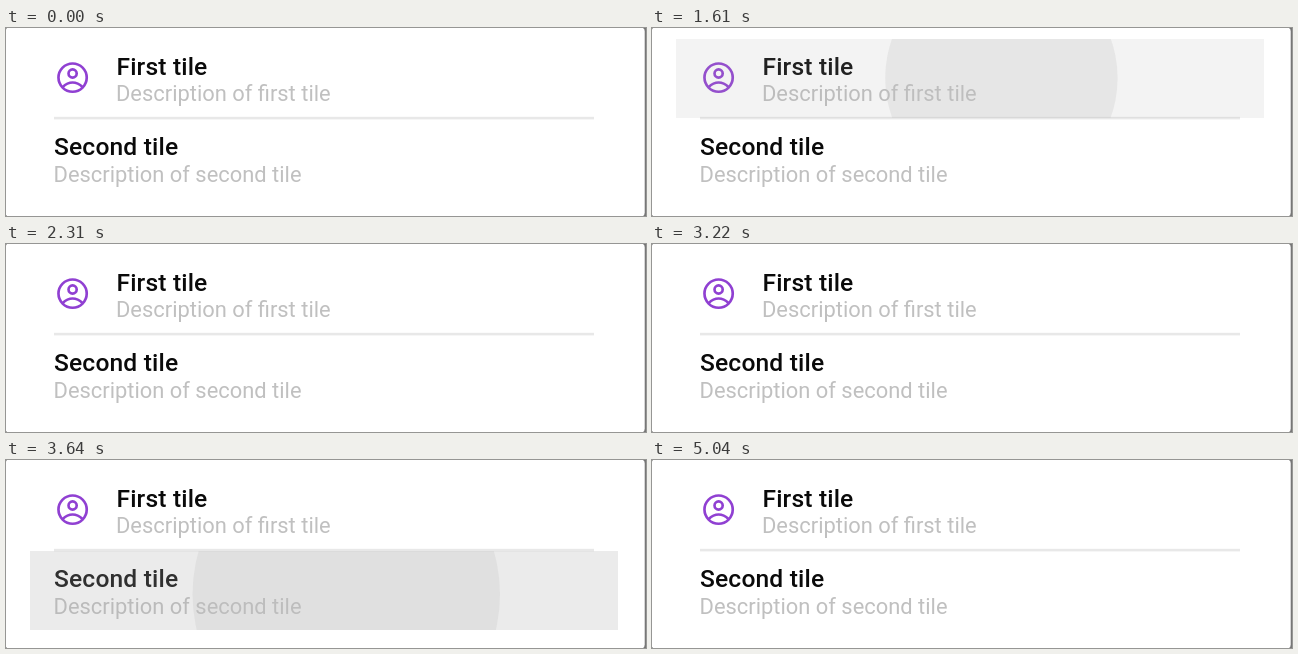
An HTML page that plays this animation: 640 px wide and 188 px high, repeating every 5.11 s.

```html
<!DOCTYPE html>
<html lang="en">
<head>
<meta charset="utf-8">
<title>List tiles</title>
<style>
  html, body { margin: 0; width: 100%; height: 100%; overflow: hidden; background: #777; }
  svg { display: block; width: 640px; height: 188px; }
  text { font-family: Roboto, sans-serif; }
  .title { font-size: 24.6px; font-weight: 500; letter-spacing: .15px; fill: #0a0a0a; }
  .note { font-size: 21.9px; fill: #c0c0c0; }
  .icon { fill: none; stroke: #9040d2; stroke-width: 1.7; }
  .highlight { fill: #aaa; opacity: 0; }
  .splash { fill: #c0c0c0; opacity: 0; }
</style>
</head>
<body>
<svg viewBox="0 0 640 188">
  <defs>
    <clipPath id="clip0"><rect x="24" y="11" width="588" height="79"/></clipPath>
    <clipPath id="clip1"><rect x="24" y="91" width="588" height="79"/></clipPath>
  </defs>
  <rect x="-.5" y="-.5" width="639.2" height="189" rx="4" fill="#fff"/>
  <rect x="48" y="88.8" width="540" height="2.6" fill="#e8e8e8"/>

  <g class="icon" transform="translate(66.6 49.6) scale(1.57) translate(-12 -12)">
    <circle cx="12" cy="12" r="9"/>
    <circle cx="12" cy="9.4" r="2.6"/>
    <path d="M5.7 18Q8.6 15.1 12 15.1T18.3 18"/>
  </g>
  <text class="title" x="110.5" y="46.5">First tile</text>
  <text class="note" x="110" y="73">Description of first tile</text>
  <text class="title" x="48" y="126.6">Second tile</text>
  <text class="note" x="47.6" y="154">Description of second tile</text>

  <g class="ink" clip-path="url(#clip0)">
    <rect class="highlight" x="24" y="11" width="588" height="79"/>
    <circle class="splash"/>
  </g>
  <g class="ink" clip-path="url(#clip1)">
    <rect class="highlight" x="24" y="91" width="588" height="79"/>
    <circle class="splash"/>
  </g>
</svg>
<script>
  const LOOP = 5110, STEP = 70;
  const RADIUS = Math.hypot(588, 79) / 2;

  // Times in ms: press, release, end of the fade. (x, y) is the touch, cy the tile's middle.
  const taps = [
    { press: 1490, release: 1955, end: 2305, x: 354, y: 50, cy: 50.5 },
    { press: 3436, release: 3980, end: 4270, x: 350, y: 136, cy: 130.5 }
  ];

  const clamp = v => Math.min(1, Math.max(0, v));
  const ramp = (t, from, to) => clamp((t - from) / (to - from));
  const mix = (a, b, k) => a + (b - a) * k;

  // Same curve as the CSS "ease" keyword.
  function ease(x) {
    const bezier = (a, b, s) => 3 * a * s * (1 - s) ** 2 + 3 * b * s * s * (1 - s) + s ** 3;
    let lo = 0, hi = 1;
    for (let i = 0; i < 24; i++) {
      const mid = (lo + hi) / 2;
      if (bezier(.25, .25, mid) < x) lo = mid; else hi = mid;
    }
    return bezier(.1, 1, lo);
  }

  const inks = [...document.querySelectorAll('.ink')].map(g => ({
    highlight: g.querySelector('.highlight'),
    splash: g.querySelector('.splash')
  }));

  function drawTap(tap, ink, t) {
    const { press, release, end } = tap;
    // Slow growth while held, quick growth once released.
    const held = Math.min(t, release) - press;
    const grown = ease(clamp(held / 1000 + Math.max(0, t - release) / 225));
    const fadeStart = mix(release, end, .6);

    ink.highlight.style.opacity =
      .235 * ramp(t, press, press + 200) * (1 - ramp(t, release, release + 200));
    ink.splash.style.opacity =
      .26 * ramp(t, press, press + 75) * (1 - ramp(t, fadeStart, end));
    ink.splash.setAttribute('cx', mix(tap.x, 318, grown));
    ink.splash.setAttribute('cy', mix(tap.y, tap.cy, grown));
    ink.splash.setAttribute('r', mix(RADIUS * .3, RADIUS + 5, grown));
  }

  const start = performance.now();
  function draw() {
    const now = Math.max(0, performance.now() - start) % LOOP;
    const t = Math.floor(now / STEP) * STEP;
    taps.forEach((tap, i) => drawTap(tap, inks[i], t));
    requestAnimationFrame(draw);
  }
  draw();
</script>
</body>
</html>
```
